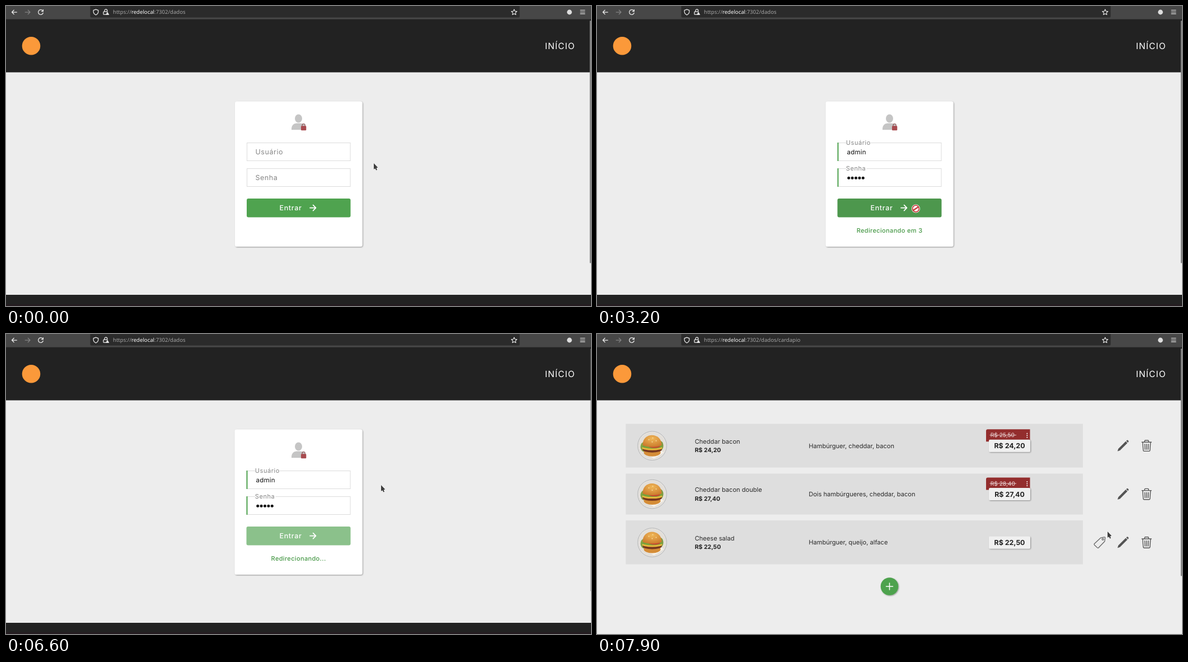
Write an HTML page that moves like this. It is 1045 px wide and 536 px high and loops after 8 s.

```html
<!DOCTYPE html>
<html lang="pt-BR">
<head>
<meta charset="utf-8">
<title>Painel</title>
<style>
  html, body { margin: 0; width: 100%; height: 100%; overflow: hidden; background: #ededed; }
  svg { display: block; width: 100vw; height: 100vh; }
  text { font-family: Inter, "Open Sans", sans-serif; text-rendering: geometricPrecision; }
  .url { font: 9.57px "Noto Sans", "Open Sans", sans-serif; fill: #a6a6a6; }
  .nav { font-size: 15.5px; letter-spacing: 1.1px; fill: #fff; }
  .label { fill: #868686; letter-spacing: .58px; }
  .typed { font-size: 11.5px; letter-spacing: .2px; fill: #111; }
  .enter { font-size: 12.5px; font-weight: 500; letter-spacing: .7px; fill: #fff; }
  .note { font-size: 11px; font-weight: 500; letter-spacing: .34px; fill: #489948; text-anchor: middle; }
  .item { font-size: 11.1px; fill: #2a2a2a; }
  .cost { font-size: 10.5px; font-weight: 700; fill: #222; }
  .tag { font-size: 12.4px; font-weight: 700; fill: #222; text-anchor: middle; }
  .old { font-size: 10.2px; fill: #f0dede; }
  .addr { font-size: 13.2px; font-weight: 600; letter-spacing: .2px; fill: #fff; }
  .tel { font-size: 11.9px; font-weight: 300; fill: #c4c4c4; }
  .line { fill: none; stroke-linecap: round; stroke-linejoin: round; }
</style>
</head>
<body>
<svg viewBox="0 0 1045 536" preserveAspectRatio="none">
  <defs>
    <filter id="soft" x="-20%" y="-20%" width="140%" height="150%">
      <feDropShadow dx="1" dy="1" stdDeviation="1.2" flood-opacity=".38"/>
    </filter>
    <clipPath id="round"><circle r="24.5"/></clipPath>
    <radialGradient id="bun" cx=".5" cy=".3" r=".75">
      <stop offset="0" stop-color="#f0b758"/><stop offset="1" stop-color="#c9782a"/>
    </radialGradient>
    <g id="meal" clip-path="url(#round)">
      <circle r="25" fill="#e3dfd9"/>
      <path d="M-22 6L3 23L21 12L-2 -3Z" fill="#f5f1ea"/>
      <ellipse cx="-14" cy="2" rx="7" ry="9" fill="#83a545"/>
      <ellipse cx="14" cy="0" rx="6" ry="9" fill="#7d9b42"/>
      <ellipse cy="12" rx="15" ry="7" fill="#d58d37"/>
      <ellipse cy="7" rx="17" ry="5" fill="#77371f"/>
      <ellipse cy="4" rx="18" ry="4" fill="#e8b73c"/>
      <ellipse cy="1" rx="18" ry="4" fill="#78a33b"/>
      <ellipse cx="4" cy="1" rx="10" ry="3" fill="#c84831"/>
      <path d="M-17 -1C-18 -25 17 -25 17 -1C10 3 -10 3 -17 -1Z" fill="url(#bun)"/>
      <g fill="#f7dc9f"><circle cx="-6" cy="-11" r="1"/><circle cx="1" cy="-14" r="1"/><circle cx="7" cy="-9" r="1"/><circle cx="0" cy="-7" r="1"/></g>
    </g>
    <path id="pencil" d="M-9.7 9.7L-8.3 5.3L5 -8L8 -5L-5.3 8.3ZM5.8 -8.8L7.2 -10Q8 -10.6 8.8 -9.9L9.9 -8.8Q10.6 -8 10 -7.2L8.8 -5.8Z" fill="#545454"/>
    <path id="trash" class="line" stroke="#555" stroke-width="1.4" d="M-8.5 -6.5H8.5M-3.5 -6.5V-8.5Q-3.5 -9.7 -2.3 -9.7H2.3Q3.5 -9.7 3.5 -8.5V-6.5M-7 -6L-6 8.2Q-5.8 9.7 -4.4 9.7H4.4Q5.8 9.7 6 8.2L7 -6M-3.2 -3L-2.8 6.5M0 -3V6.5M3.2 -3L2.8 6.5"/>
    <g id="label" class="line" stroke="#666" stroke-width="1.3">
      <path d="M-9.6 2.3L2 -8.4L8.3 -9.6Q9.9 -9.8 9.7 -8.2L8.9 -2L-2.2 9.5Q-3.2 10.4 -4.2 9.4L-9.6 4.2Q-10.4 3.2 -9.6 2.3Z"/>
      <circle cx="5.6" cy="-5.8" r="1.5"/>
    </g>
  </defs>

  <rect width="1045" height="536" fill="#ededed"/>
  <rect width="1045" height="24" fill="#474747"/>
  <rect y="23" width="1045" height="1" fill="#3a3a3a"/>
  <rect x="150.5" y="-3" width="767" height="23.5" rx="2.5" fill="#2b2b2b" stroke="#383838"/>
  <g class="line" stroke="#eee" stroke-width="1.25">
    <path d="M19.3 11H10.8M14.2 7.3L10.5 11L14.2 14.7"/>
    <path d="M34.2 11H42.7M39.3 7.3L43 11L39.3 14.7" stroke="#838383"/>
    <path d="M66 9A4.4 4.4 0 1 0 66.3 12.3M66.4 6.5V9.5H63.4"/>
    <path d="M160.5 6.2L164.8 7.7V10.5Q164.6 14 160.5 15.9Q156.4 14 156.2 10.5V7.7Z"/>
    <path d="M176 10V8.3A2.4 2.4 0 0 1 180.8 8.3V10M179 15.2H175Q174 15.2 174 14.2V11Q174 10 175 10H181"/>
    <path d="M181.3 11.2L183.8 15.5H178.8Z" fill="#eee" stroke-width=".8"/>
    <path d="M907.7 6L909.2 9.2L912.7 9.6L910.1 12L910.8 15.5L907.7 13.8L904.6 15.5L905.3 12L902.7 9.6L906.2 9.2Z" stroke-width="1.1"/>
    <path d="M1026 7.5H1034M1026 10.7H1034M1026 13.9H1034" stroke-width="1.1"/>
  </g>
  <circle cx="1006.5" cy="11" r="4.4" fill="#ddd"/>
  <text class="url" x="191" y="14.3">https://<tspan fill="#fbfbfb">redelocal</tspan>:7302/dados<tspan id="path"></tspan></text>

  <rect y="24" width="1045" height="94.5" fill="#222"/>
  <circle cx="45" cy="71.3" r="16.3" fill="#fb993a"/>
  <text class="nav" x="962.7" y="76.8">INÍCIO</text>

  <g id="login">
    <rect y="516" width="1045" height="20" fill="#222"/>
    <rect y="533" width="1045" height="3" fill="#251c21"/>
    <rect id="card" y="170.5" height="259.5" rx="3.5" fill="#fff" filter="url(#soft)"/>
    <g fill="#c5c5c5">
      <ellipse cx="522.5" cy="201" rx="6.5" ry="7.4"/>
      <path d="M510 221.3V218.5Q511 209.8 519 209.4H526Q533 209.8 534.5 215V221.3Z"/>
    </g>
    <path d="M529 215V213.3A2.6 2.6 0 0 1 534.2 213.3V215" fill="none" stroke="#8d5558" stroke-width="1.2"/>
    <rect x="527" y="214.3" width="9.3" height="8" rx="1.3" fill="#a84a4f"/>
    <g id="fields"></g>
    <text id="user" class="typed" x="446.5" y="264.9"></text>
    <g id="dots" fill="#111"></g>
    <rect id="caret" width="1" height="12" fill="#222"/>
    <rect id="button" y="344" height="33.5" rx="3"/>
    <text class="enter" x="488.4" y="364.8">Entrar</text>
    <path class="line" d="M543 360.6H553M548.6 355.6L553.5 360.6L548.6 365.6" stroke="#fff" stroke-width="1.7"/>
    <text id="note" class="note" x="522.6" y="404.6"></text>
  </g>

  <g id="load">
    <path d="M502.8 169.6A29.5 29.5 0 1 0 545.7 173.3" fill="none" stroke="#8a8a8a" stroke-width="4"/>
    <rect y="434.5" width="1045" height="101.5" fill="#222"/>
    <rect y="533" width="1045" height="3" fill="#251c21"/>
    <g class="line" stroke="#fff" stroke-width="1.1">
      <path d="M34 477.7C31.6 474 29 471.3 29 468.3A5 5 0 0 1 39 468.3C39 471.3 36.4 474 34 477.7Z"/>
      <circle cx="34" cy="468.3" r="1.9"/>
      <path stroke="#bbb" d="M28 494.8L30.2 494Q31.3 493.7 31.8 494.7L33 497.3Q33.3 498.2 32.6 498.9L31.3 500Q32.6 502.8 35.2 504.2L36.5 502.7Q37.2 502 38 502.4L40.5 503.6Q41.4 504.1 41.1 505L40.5 507Q40.2 508 39 508C33 508 27 501.8 27 496Q27 495.2 28 494.8Z"/>
    </g>
    <text class="addr" x="52.5" y="475.2">Rua Dorelo Vanmick, 3947, Mirassuba, Vila Orna, 29073-418</text>
    <text class="tel" x="52.8" y="505.2">(07) 3019-2846</text>
  </g>

  <g id="list">
    <g id="rows"></g>
    <circle cx="522.5" cy="451" r="15.8" fill="#4da24d" filter="url(#soft)"/>
    <path class="line" d="M516.5 451H528.5M522.5 445V457" stroke="#fff" stroke-width="1.5"/>
  </g>

  <rect id="bar" y="26" rx="1" fill="#858585"/>
  <g id="cursor">
    <path id="arrow" d="M0 0V10.8L2.5 9.2L4.2 12.6L6 11.7L4.6 8.4L7.2 7.6Z" fill="#3d3d3d" stroke="#f4f4f4" stroke-width=".6" paint-order="stroke"/>
    <path id="beam" class="line" d="M-2 -5.5Q0 -5.5 0 -4.5Q0 -5.5 2 -5.5M0 -4.5V4.5M-2 5.5Q0 5.5 0 4.5Q0 5.5 2 5.5" stroke="#444"/>
    <path id="hand" d="M-1.2 -5Q0 -6.3 1.2 -5V-1L4.6 0Q5.8 .5 5.6 2L4.8 6H-1.6L-4.8 1.8Q-4.2 .3 -2.8 1.1L-1.2 2.4Z" fill="#3d3d3d" stroke="#f4f4f4" stroke-width=".8"/>
    <g id="stop" fill="none">
      <circle r="7.6" fill="#fff"/>
      <circle r="5.9" stroke="#c63b3b" stroke-width="1.8"/>
      <path d="M-4.6 3L4.6 -3" stroke="#c63b3b" stroke-width="2.4"/>
    </g>
  </g>
</svg>
<script>
const LOOP = 8000, STEP = 100;
const $ = id => document.getElementById(id);
const set = (el, attrs) => { for (const k in attrs) el.setAttribute(k, attrs[k]); };
const show = (el, on) => { el.style.display = on ? '' : 'none'; };
const ramp = (t, a, b) => Math.min(1, Math.max(0, (t - a) / (b - a)));
const mix = (a, b, k) => a + (b - a) * k;

// Pointer path: time, x, y
const path = [
  [0, 657, 281], [500, 563.5, 264], [2500, 563.5, 264], [3000, 569.5, 362],
  [3600, 569.5, 362], [4300, 669, 273], [4500, 669, 273], [4700, 670, 270],
  [6600, 670, 270], [6700, 670, 279], [6800, 671, 284], [6900, 671, 284],
  [7800, 903.5, 336], [7900, 912, 353], [8000, 912, 353]
];

function pointer(t) {
  let i = 0;
  while (i < path.length - 2 && t >= path[i + 1][0]) i++;
  const [a, ax, ay] = path[i], [b, bx, by] = path[i + 1];
  const k = ramp(t, a, b), e = k * k * (3 - 2 * k);
  return [mix(ax, bx, e), mix(ay, by, e)];
}

function makeField(name, top, gap) {
  $('fields').insertAdjacentHTML('beforeend', `<g>
    <rect y="${top + .5}" height="32" fill="#fff"/>
    <rect y="${top}" width="2" height="33" fill="#4fa34f"/>
    <rect x="445" y="${top - 1}" width="${gap}" height="4" fill="#fff"/>
    <text class="label">${name}</text></g>`);
  const [box, edge, hole, label] = $('fields').lastElementChild.children;
  return (left, lift, focus, valid) => {
    set(box, { x: left + .5, width: 615 - left - .5, stroke: focus ? '#a3a3a3' : '#dcdcdc' });
    set(edge, { x: left });
    show(edge, valid);
    show(hole, lift > .6);
    set(label, { x: mix(445.4, 444.8, lift), y: top + mix(20.7, 4.3, lift) });
    label.style.fontSize = mix(12.5, 11, lift) + 'px';
  };
}
const userField = makeField('Usuário', 244, 44);
const passField = makeField('Senha', 290, 36.5);

for (let i = 0; i < 5; i++)
  $('dots').insertAdjacentHTML('beforeend', `<circle cx="${449.7 + i * 6.4}" cy="307.3" r="2.5"/>`);

// Name, price, contents, former price, row top, row height
const items = [
  ['Cheddar bacon', '24,20', 'Hambúrguer, cheddar, bacon', '25,50', 160.5, 78],
  ['Cheddar bacon double', '27,40', 'Dois hambúrgueres, cheddar, bacon', '28,40', 249.5, 73],
  ['Cheese salad', '22,50', 'Hambúrguer, queijo, alface', '', 333, 78.5]
];
const promo = old => `
  <path d="M695 -26.5Q695 -29.5 698 -29.5H773.5V-7.5H695Z" fill="#932d2d"/>
  <text class="old" x="702.7" y="-15.6">R$ ${old}</text>
  <path d="M701.5 -19H749" stroke="#f0dede" stroke-width=".9"/>
  <g fill="#fff"><circle cx="768.3" cy="-22" r="1"/><circle cx="768.3" cy="-18.5" r="1"/><circle cx="768.3" cy="-15" r="1"/></g>`;
$('rows').innerHTML = items.map(([name, cost, parts, old, top, high], i) => `
  <rect x="51.5" y="${top}" width="816.5" height="${high}" fill="#dedede"/>
  <g transform="translate(0 ${199.7 + i * 86.4})">
    <circle cx="98.6" r="25.8" fill="#e8e8e8" stroke="#b2b2b2"/>
    <use class="photo" href="#meal" x="98.6"/>
    <text class="item" x="174.7" y="-4">${name}</text>
    <text class="cost" x="174.7" y="11.8">R$ ${cost}</text>
    <text class="item" x="378.2" y="3.9">${parts}</text>
    ${old ? promo(old) : '<use href="#label" x="898"/>'}
    <rect x="700" y="-11" width="74" height="22" rx="2" fill="#f0f0f0" filter="url(#soft)"/>
    <text class="tag" x="737" y="4.6">R$ ${cost}</text>
    <use href="#pencil" x="939.5"/><use href="#trash" x="981.8"/>
  </g>`).join('');
const photos = document.querySelectorAll('.photo');

function note(t) {
  if (t < 3200) return '';
  if (t >= 6200) return 'Redirecionando...';
  return 'Redirecionando em ' + (t < 4200 ? 3 : t < 5200 ? 2 : 1);
}

function drawLogin(t, inButton) {
  const left = t < 900 ? 430 : 429.5;
  set($('card'), { x: left - 21, width: 657.5 - left });
  userField(left, ramp(t, 400, 700), t >= 500 && t < 1500, t >= 900);
  passField(left, ramp(t, 1400, 1600), t >= 1500 && t < 3200, t >= 1700);

  const typed = 'admin'.slice(0, Math.max(0, (t - 800) / STEP));
  $('user').textContent = typed;
  const count = t >= 2200 ? 5 : Math.min(4, Math.max(0, (t - 1600) / STEP));
  [...$('dots').children].forEach((dot, i) => show(dot, i < count));

  const inPass = t >= 1500;
  const x = inPass ? 446 + count * 6.4 : 446 + (typed ? $('user').getComputedTextLength() : 0);
  set($('caret'), { x, y: inPass ? 301 : 255 });
  show($('caret'), t >= 600 && t < 3200);

  const fill = t >= 3400 ? '#8bc18b' : t === 3300 ? '#6cac6c'
    : t === 3200 || inButton ? '#4d974d' : '#4fa34f';
  set($('button'), { x: left, width: 615.5 - left, fill });
  $('note').textContent = note(t);
}

function draw(now) {
  const t = Math.floor(now % LOOP / STEP) * STEP;
  const login = t < 6700, list = t >= 6800;
  show($('login'), login);
  show($('load'), !login && !list);
  show($('list'), list);
  $('path').textContent = login ? '' : '/cardapio';

  const [x, y] = pointer(t);
  const over = (top, bottom) => login && x > 430 && x < 615 && y > top && y < bottom;
  const inButton = over(344, 378);
  const kind = inButton ? (t < 3200 ? 'hand' : 'stop')
    : over(244, 277) || over(290, 323) ? 'beam' : 'arrow';
  set($('cursor'), { transform: `translate(${x} ${y})` });
  for (const id of ['arrow', 'beam', 'hand', 'stop']) show($(id), id === kind);

  if (login) drawLogin(t, inButton);
  photos.forEach(p => show(p, t >= 7000));

  const idle = t < 2600 ? ramp(t, 1400, 2000) : t < 5700 ? 1 - ramp(t, 2500, 2700) : list ? 0 : ramp(t, 5700, 6200);
  const wide = mix(2.2, 1.2, idle);
  set($('bar'), { x: 1045 - wide, width: wide, height: list ? 406.5 : 433.5, opacity: mix(1, .6, idle) });
  show($('bar'), login || list);
}

const start = performance.now();
function tick() {
  draw(performance.now() - start);
  requestAnimationFrame(tick);
}
tick();
</script>
</body>
</html>
```
